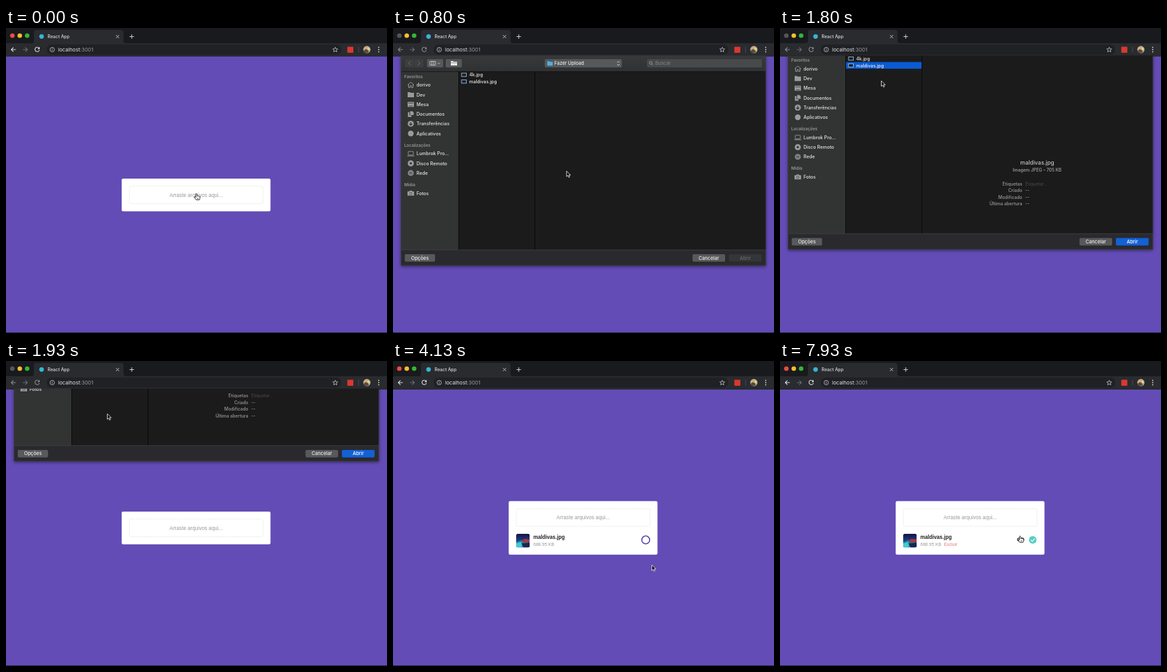
These frames come from a looping animation (600x480 px, 8000 ms). An HTML page:

```html
<!DOCTYPE html>
<html lang="pt-BR">
<head>
<meta charset="utf-8">
<title>Upload</title>
<style>
html, body { margin: 0; width: 100%; height: 100%; overflow: hidden; background: #634cb6; }
svg { display: block; width: 100%; height: 100%; }
text { font-family: Inter, "Open Sans", sans-serif; white-space: pre; }
.page text { font-family: "Liberation Sans", Arial, sans-serif; }
</style>
</head>
<body>
<svg id="stage" viewBox="0 0 600 480"></svg>
<script>
const LOOP = 8000;
const OPEN = [365, 665], READY = 730, SELECT = 1400, CLOSE = [1750, 2050];
const LISTED = 2230, DONE = 5870;
const SHEET_H = 331;
const RING = 2 * Math.PI * 6.2;

const text = (x, y, size, str, fill, weight = 400, anchor = 'start') =>
  `<text x="${x}" y="${y}" font-size="${size}" fill="${fill}" font-weight="${weight}" text-anchor="${anchor}">${str}</text>`;
const rect = (x, y, w, h, fill, r = 0, extra = '') =>
  `<rect x="${x}" y="${y}" width="${w}" height="${h}" fill="${fill}" rx="${r}" ${extra}/>`;
const circle = (x, y, r, fill, extra = '') =>
  `<circle cx="${x}" cy="${y}" r="${r}" fill="${fill}" ${extra}/>`;
const line = (d, stroke, w = 1, extra = '') =>
  `<path d="${d}" fill="none" stroke="${stroke}" stroke-width="${w}" ${extra}/>`;
const group = (id, body, extra = '') => `<g id="${id}" ${extra}>${body}</g>`;

// Browser frame
const chrome =
  rect(0, 0, 600, 25, '#181a1d') +
  '<path d="M40 24q4 0 4-4V7q0-4 4-4H181q4 0 4 4V20q0 4 4 4z" fill="#292b2f"/>' +
  rect(0, 24, 600, 21, '#292b2f') +
  rect(64, 26, 464, 16, '#202125', 8) +
  '<circle id="red" cx="10" cy="12" r="3.6"/>' +
  circle(21.7, 12, 3.6, '#f6bd2f') + circle(33.3, 12, 3.6, '#36b536') +
  circle(56, 13.3, 3.6, '#35b5d3') +
  text(65.5, 16, 7, 'React App', '#dcdee0', 500) +
  line('M173.2 11l5 5m0-5l-5 5', '#c9cbce', .9) +
  line('M194.5 13.5h7m-3.5-3.5v7', '#d5d7d9', 1) +
  group('nav',
    line('M15.4 34H8.5m3.2-3.4L8.3 34l3.4 3.4', 'currentColor', 1.1) +
    line('M52 31.6a3.5 3.5 0 1 0 .6 3', 'currentColor', 1.1) +
    '<path d="M53 29.8v3.4h-3.4z" fill="currentColor"/>') +
  line('M26.5 34h7m-3.2-3.4l3.4 3.4l-3.4 3.4', '#6d7074', 1.1) +
  circle(72.8, 34, 3.5, 'none', 'stroke="#c3c5c8" stroke-width=".9"') +
  line('M72.8 33.4v2.5m0-4.3v1', '#c3c5c8', .9) +
  '<text x="82" y="37" font-size="8.1" fill="#e4e6e8">localhost<tspan fill="#9b9ea2">:3001</tspan></text>' +
  line('M518.5 30.2l1.1 2.6 2.8.2-2.1 1.8.7 2.8-2.5-1.5-2.5 1.5.7-2.8-2.1-1.8 2.8-.2z', '#d2d4d6', .8) +
  rect(537.5, 29.5, 9.5, 9.5, '#d9382f', 1) +
  line('M555.3 29.5v9', '#505257', .8) +
  circle(568.3, 34, 5.7, '#b9b3a2') +
  circle(566.8, 31.7, 2.4, '#dba95d') +
  '<path d="M563 37q1-3.5 4-3.5t4.5 4q-4.500 4.500-8.500-.5z" fill="#5b4a43"/>' +
  circle(571, 33, 1.7, '#e9dc70') +
  [30.5, 34, 37.5].map(y => circle(587, y, .9, '#dcdee0')).join('');

// Upload card
const thumb =
  '<g clip-path="url(#thumbClip)">' + rect(194, 272, 21.300, 21.300, 'url(#photo)') +
  '<path d="M194 285l8-3 5 2 9 3v7h-22z" fill="#168aa8"/>' +
  '<path d="M194 287l7-2 4 3-4 6h-7z" fill="#49c7d1"/>' +
  '<path d="M203 283l4-3 8 1v4l-10 1z" fill="#a63a40"/>' +
  '<path d="M202 287l13-1v8h-9z" fill="#172752"/></g>';

const link =
  line('M377.900 278.500h-1.400a2.500 2.500 0 0 0 0 5h1.400m2.200 0h1.400a2.500 2.500 0 0 0 0-5h-1.400m-3.200 2.500h4.200', '#222', 1.1);

const page =
  rect(0, 45, 600, 434.3, '#634cb6') + rect(0, 479.2, 600, .8, '#17131f') +
  '<rect id="card" x="182.200" width="234.300" rx="2.200" fill="#fff"/>' +
  group('drop',
    rect(194.2, 0, 210.6, 27.8, 'none', 2, 'stroke="#d8d8d8" stroke-width=".7" stroke-dasharray="1.6 1.300"') +
    text(299.4, 16.8, 8.17, 'Arraste arquivos aqui...', '#999', 400, 'middle')) +
  group('file', thumb +
    text(221, 280.3, 8.17, 'maldivas.jpg', '#222', 700) +
    text(221, 290.8, 7.05, '688.95 KB', '#999') +
    group('ring',
      circle(398, 281.5, 6.2, 'none', 'stroke="#dedee6" stroke-width="1.5"') +
      circle(398, 281.5, 6.2, 'none', 'id="arc" stroke="#5a43b0" stroke-width="1.6" transform="rotate(-90 398 281.5)"')) +
    group('done',
      text(258.3, 290.8, 7.05, 'Excluir', '#e57878') + link +
      circle(398, 281.5, 6, '#55d0c2') +
      line('M395 281.700l2.200 2.200 4.300-4.700', '#fff', 1.2)));

// File dialog
const icons = {
  house: line('M-5 0L0-4.500L5 0M-3.500-1v5h2.500v-3h2v3h2.500v-5', 'currentColor', 1),
  folder: '<path d="M-5-4h4l1 1h5v7H-5z"/>',
  desk: rect(-5, -4, 10, 8, 'currentColor', 1) + line('M-4-2h8M-3 2.500h6', '#303132', .8),
  docs: '<path d="M-4.500-3H-2v5h3v2.500h-5.500zM-1-4.500h3.500L4.500-2.500V1.500H-1z"/>',
  down: circle(0, 0, 4.8, 'currentColor') + line('M0-2.800v5M-2.300 0L0 2.400L2.300 0', '#303132', 1.2),
  dot: circle(0, 0, 4.500, 'currentColor'),
  laptop: rect(-4, -3.400, 8, 5.600, 'none', .6, 'stroke="currentColor" stroke-width=".9"') + line('M-5.500 3.600h11', 'currentColor', 1),
  disc: circle(0, 0, 3.3, 'none', 'stroke="currentColor" stroke-width="3"'),
  globe: circle(0, 0, 4.6, 'currentColor') + line('M-4.500 0h9M0-4.500v9M-2.500-3.500q2.500 3.500 0 7M2.500-3.500q-2.500 3.500 0 7', '#303132', .6),
  camera: '<path d="M-5.200-2.700h2.600l.8-1.300h3.600l.8 1.300h2.600v6.500H-5.200z"/>' + circle(0, .4, 1.900, 'none', 'stroke="#303132" stroke-width=".6"')
};
const row = (y, icon, label) =>
  `<g transform="translate(28 ${y})" fill="currentColor" color="#9a9b9d">${icons[icon]}</g>` +
  text(37, y + 2.700, 7.3, label, 'currentColor', 500);
const head = (y, label) => text(17.700, y + 2.300, 6.5, label, '#97989a', 600);
const meta = (y, label, value, fill = '#bbb') =>
  text(381.500, y + 2.600, 6.9, label, '#8d8d8e', 600, 'end') + text(386.300, y + 2.600, 6.9, value, fill);
const button = (x, w, label, id) =>
  `<rect id="${id}" x="${x}" y="356" width="${w}" height="11.700" rx="1.800" fill="#58595a"/>` +
  `<text id="${id}Label" x="${x + w / 2}" y="364.500" font-size="7.5" font-weight="500" text-anchor="middle" fill="#eee">${label}</text>`;
const fileIcon = y => rect(108, y - 2.500, 7.600, 5.200, '#123', 0, 'stroke="#bfd2e6" stroke-width=".8"');

const sidebar =
  head(76.5, 'Favoritos') +
  [['house', 'dorivo'], ['folder', 'Dev'], ['desk', 'Mesa'], ['docs', 'Documentos'],
   ['down', 'Transferências'], ['dot', 'Aplicativos']]
    .map(([icon, label], i) => row(89.7 + i * 15.25, icon, label)).join('') +
  head(184.5, 'Localizações') +
  row(197.700, 'laptop', 'Lumbrok Pro...') + row(213, 'disc', 'Disco Remoto') +
  group('net', row(228.2, 'globe', 'Rede')) +
  group('media', head(246.5, 'Mídia') + row(260, 'camera', 'Fotos'));

const toolbar =
  rect(19, 49, 14, 13, '#3d3e40', 1.800) + rect(34, 49, 14, 13, '#3d3e40', 1.800) +
  line('M27.500 52.700l-3 2.900 3 2.900M39.500 52.700l3 2.900-3 2.900', '#707173', 1) +
  rect(53.500, 49, 25.500, 13, '#57585a', 1.800) +
  rect(58, 52.500, 9, 6, 'none', .5, 'stroke="#ddd" stroke-width=".8"') +
  line('M61 52.500v6M64 52.500v6M70.500 54.800l1.700 1.700 1.700-1.700', '#ddd', .8) +
  rect(83, 49, 25.500, 13, '#57585a', 1.800) +
  '<path d="M91 52h3.500l1 1H101v6H91z" fill="#e8e8e8"/>' + line('M91 54.700h10', '#57585a', .6) +
  rect(239, 49, 121.500, 13, '#57585a', 2) +
  '<path d="M243 52.300h3l1 1h4.500v6H243z" fill="#4bb1e3"/>' +
  text(254, 58.400, 7.4, 'Fazer Upload', '#ececec', 500) +
  line('M353 54.500l2-2 2 2M353 57l2 2 2-2', '#e2e2e2', .9) +
  rect(400, 49, 181, 13, '#48494b', 2) +
  circle(406, 55, 2.2, 'none', 'stroke="#aaa" stroke-width=".8"') + line('M407.600 56.700l2 2', '#aaa', .8) +
  text(413, 58.300, 7.4, 'Buscar', '#858688');

const sheet =
  rect(12.5, 43, 574.7, SHEET_H, '#2a2b2d', 0, 'filter="url(#shadow)"') +
  rect(12.5, 43, 574.7, 25.5, 'url(#bar)') + toolbar +
  '<rect id="side" x="12.500" y="68.500" width="91" height="280.500"/>' +
  rect(103.5, 68.5, 483.7, 280.5, '#1b1b1c') +
  line('M103.500 68.500V349M223.500 68.500V349', '#070707', 1) +
  line('M12.500 68.700H587', '#111', .7) + line('M12.500 349.200H587', '#454648', .7) +
  line('M12.700 43V373.800H587V43', '#48494b', .6) +
  group('places', sidebar) +
  group('files',
    fileIcon(73.5) + text(120, 76.3, 7.2, '4k.jpg', '#e6e6e6', 500) +
    '<rect id="pick" x="104" y="79" width="119" height="10.500" fill="#0a5bd3"/>' +
    fileIcon(84.2) + text(120, 87, 7.2, 'maldivas.jpg', '#f2f2f2', 500)) +
  group('preview',
    text(405, 240, 9, 'maldivas.jpg', '#dcdcdc', 400, 'middle') +
    text(405, 251.700, 6.9, 'Imagem JPEG – 705 KB', '#949495', 600, 'middle') +
    meta(270.7, 'Etiquetas', 'Etiquetar...', '#4c4c4d') + meta(281.3, 'Criado', '--') +
    meta(291.8, 'Modificado', '--') + meta(302.3, 'Última abertura', '--')) +
  button(18.5, 47.7, 'Opções', 'options') + button(471.7, 51.3, 'Cancelar', 'cancel') +
  button(529, 51.5, 'Abrir', 'accept');

const cursors =
  group('arrow', '<path d="M0 0V8.700L2 6.900L3.500 10L5 9.300L3.600 6.300H6.300z" fill="#111" stroke="#fff" stroke-width=".8" stroke-linejoin="round"/>') +
  group('hand', '<path d="M-1.200.8Q-.9-.4.1.1Q.8.5.9 1.700L1.200 4Q2.200 3.200 2.800 4.200Q3.700 3.600 4.200 4.600Q5.500 4.200 5.500 5.700Q5.600 8 4.500 9.900H-.7Q-1.500 8.300-2.900 6.500Q-3.800 5.200-2.700 5Q-1.700 5-.8 6z" fill="#fff" stroke="#111" stroke-width=".9" stroke-linejoin="round"/>' +
    line('M1.300 6.700v2M2.700 6.700v2', '#111', .6));

const svg = document.getElementById('stage');
svg.innerHTML =
  `<defs>
    <linearGradient id="photo" x2="0" y2="1"><stop stop-color="#12133f"/><stop offset=".5" stop-color="#263a86"/><stop offset="1" stop-color="#126f91"/></linearGradient>
    <linearGradient id="bar" x2="0" y2="1"><stop stop-color="#38393b"/><stop offset="1" stop-color="#303133"/></linearGradient>
    <clipPath id="thumbClip"><rect x="194" y="272" width="21.300" height="21.300" rx="2.500"/></clipPath>
    <clipPath id="sheetClip"><rect y="43.500" width="600" height="437"/></clipPath>
    <filter id="shadow" x="-5%" y="-5%" width="110%" height="112%"><feDropShadow dx="0" dy="1.500" stdDeviation="2.500" flood-opacity=".5"/></filter>
  </defs>` +
  group('page', page, 'class="page"') + chrome +
  `<g clip-path="url(#sheetClip)">${group('sheet', sheet)}</g>` + cursors;

const el = {};
svg.querySelectorAll('[id]').forEach(n => el[n.id] = n);
const set = (id, attrs) => { for (const k in attrs) el[id].setAttribute(k, attrs[k]); };
const show = (id, on) => set(id, { visibility: on ? 'inherit' : 'hidden' });
const move = (id, x, y) => set(id, { transform: `translate(${x} ${y})` });

const clamp = v => Math.min(1, Math.max(0, v));
const ease = (t, a, b) => { const p = clamp((t - a) / (b - a)); return p * p * (3 - 2 * p); };

// Pointer stops: time, x, y
const path = [
  [70, 300, 260.5], [480, 294, 251], [620, 294, 251], [1350, 159.5, 83], [2080, 159.5, 83],
  [2600, 450, 281], [2670, 450, 281], [3330, 425, 321], [3870, 425, 321], [4330, 396, 321],
  [4470, 396, 321], [5200, 351.3, 301], [6870, 351.3, 301], [7670, 377, 276.5],
  [7730, 377, 276.5], [7930, 378.3, 275.5]
];
function pointer(t) {
  let [, x, y] = path[0];
  for (let i = 1; i < path.length && t > path[i - 1][0]; i++) {
    const [t0, x0, y0] = path[i - 1], [t1, x1, y1] = path[i];
    const p = ease(t, t0, t1);
    x = x0 + (x1 - x0) * p;
    y = y0 + (y1 - y0) * p;
  }
  return [x, y];
}

function render(t) {
  const down = ease(t, ...OPEN) - ease(t, ...CLOSE);
  const ready = t >= READY, picked = t >= SELECT, listed = t >= LISTED, done = t >= DONE;
  const modal = t >= OPEN[0] && t < CLOSE[1];

  show('sheet', modal);
  move('sheet', 0, (down - 1) * SHEET_H);
  set('red', { fill: modal ? '#55575a' : '#ee4b45' });
  set('nav', { color: ready && modal ? '#8c8f93' : '#e2e4e6' });
  set('side', { fill: ready ? '#323333' : '#27282a' });
  set('places', { color: ready ? '#e4e4e4' : '#a3a4a6' });
  show('net', ready);
  move('media', 0, ready ? 0 : -15.4);
  show('files', ready);
  show('pick', picked);
  show('preview', picked);
  set('accept', { fill: picked ? '#1261d6' : '#343537' });
  set('acceptLabel', { fill: picked ? '#fff' : '#68696b' });

  set('card', listed ? { y: 220.5, height: 84.3 } : { y: 237, height: 51.5 });
  move('drop', 0, listed ? 232.4 : 248.8);
  show('file', listed);
  show('ring', !done);
  show('done', done);
  const progress = clamp((t - LISTED) / 430);
  set('arc', { 'stroke-dasharray': `${RING * progress} ${RING * 2}` });

  const [x, y] = pointer(t);
  const hand = t < OPEN[1] || t >= 7400;
  show('hand', hand);
  show('arrow', !hand);
  move(hand ? 'hand' : 'arrow', x, y);
}

function tick() {
  render(performance.now() % LOOP);
  requestAnimationFrame(tick);
}
tick();
</script>
</body>
</html>
```
